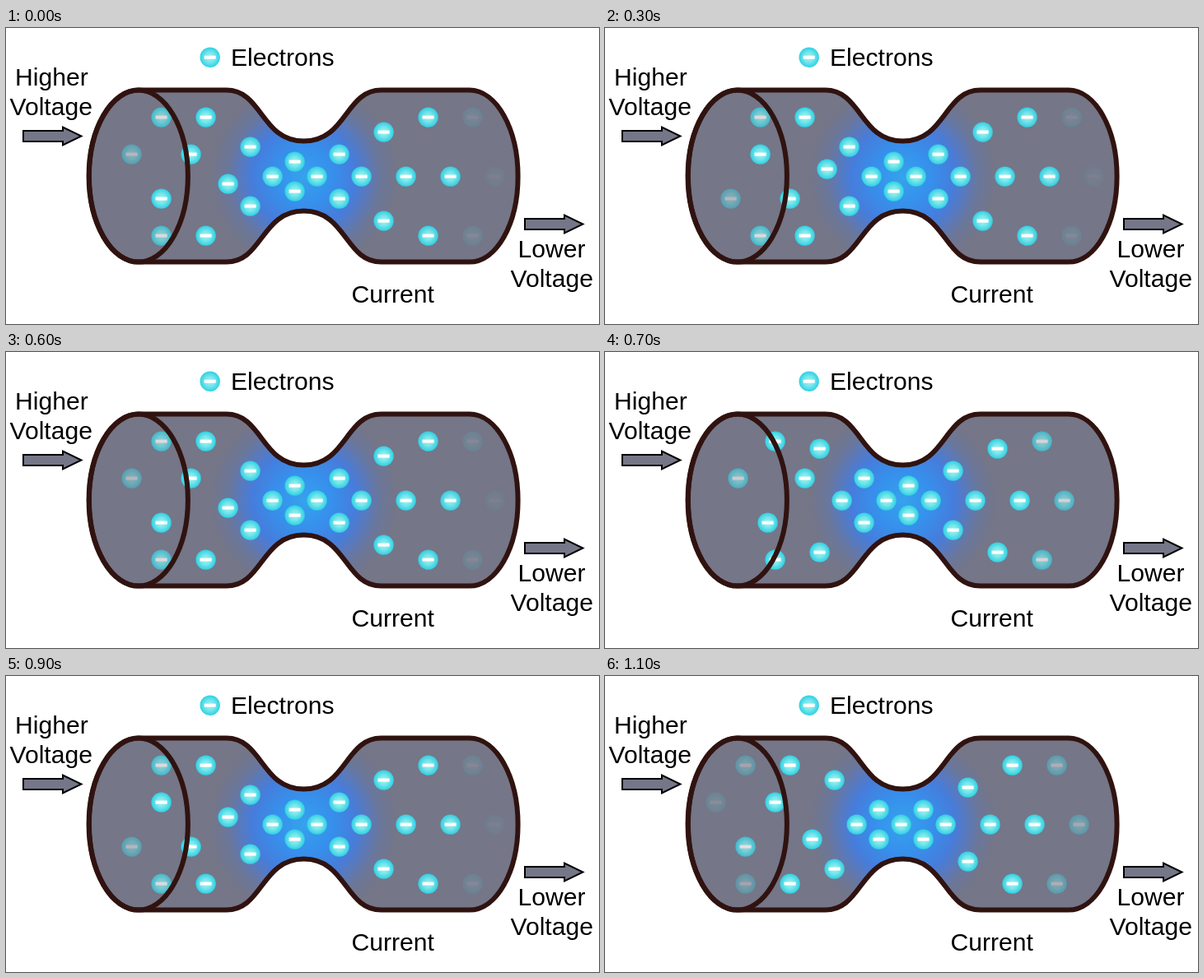
An HTML page that plays this animation: 720x360 px, repeating every 1200 ms.

```html
<!DOCTYPE html>
<html lang="en">
<head>
<meta charset="utf-8">
<title>Current through a conductor</title>
<style>
  html, body { margin: 0; width: 100%; height: 100%; overflow: hidden; background: #fff; }
  svg { display: block; width: 720px; height: 360px; }
  text { font: 30.1px "Liberation Sans", Arial, sans-serif; }
</style>
</head>
<body>
<svg viewBox="0 0 720 360">
  <defs>
    <radialGradient id="cyan">
      <stop offset="0" stop-color="#a9f3f1"/>
      <stop offset=".5" stop-color="#76e6ea"/>
      <stop offset="1" stop-color="#2fd0e4"/>
    </radialGradient>
    <radialGradient id="glow" gradientUnits="userSpaceOnUse" cx="361" cy="180" r="114">
      <stop offset="0" stop-color="#36a2ec"/>
      <stop offset=".3" stop-color="#3690ec"/>
      <stop offset=".55" stop-color="#467ddc"/>
      <stop offset=".7" stop-color="#5c79b8"/>
      <stop offset=".81" stop-color="#6a779b"/>
      <stop offset="1" stop-color="#757687"/>
    </radialGradient>
    <g id="electron">
      <circle r="12.2" fill="url(#cyan)"/>
      <rect x="-7" y="-2" width="14" height="4" fill="#fff"/>
    </g>
    <path id="arrow" d="M0-6.5H48V-11L70.5 0 48 11V6.5H0Z" fill="#757687" stroke="#000" stroke-width="2"/>
  </defs>

  <g transform="translate(.6 .6)">
    <path fill="url(#glow)" stroke="#301310" stroke-width="6" d="M160 75H267C311 75 309 137 361 137S411 75 455 75H562C595 75 621 122 621 180S595 284 562 284H455C411 284 413 222 361 222S311 284 267 284H160A60 104.5 0 0 1 160 75Z"/>
    <g id="electrons"></g>
    <ellipse cx="160.3" cy="179.5" rx="60" ry="104.5" fill="none" stroke="#301310" stroke-width="6"/>
  </g>

  <use href="#electron" x="247.7" y="35.7"/>
  <use href="#arrow" x="21" y="131.5"/>
  <use href="#arrow" x="630" y="238.5"/>
  <text x="273" y="46">Electrons</text>
  <text x="11" y="70">Higher</text>
  <text x="4.5" y="106">Voltage</text>
  <text x="621.5" y="279">Lower</text>
  <text x="612.5" y="315">Voltage</text>
  <text x="419.5" y="334">Current</text>
</svg>
<script>
const STEP = 100, STEPS = 12, SPEED = 18, SPACING = 3 * SPEED, GRID = 9, AXIS = 180;
const layer = document.getElementById("electrons");
const pool = [];

const clamp = (value, low = 0, high = 1) => Math.min(high, Math.max(low, value));
const snap = value => GRID * Math.round(value / GRID);

// The outer rows squeeze into the neck quickly and spread out again slowly
const rowOffset = x => snap(clamp(Math.max(18 + (332 - x) * .6, 18 + (x - 386) / 2), 18, 72));
const rowFade = x => clamp((x - 155) / 45) * clamp((574 - x) / 64);

// Inner electrons speed up until they join the axis, alternating above and below it
const laneX = stepsLeft => 188 + snap(98 - 16.56 * stepsLeft + .28 * stepsLeft ** 2);
const laneOffset = x => snap(clamp((287 - x) / 2, 0, 27));

function electronsAt(step) {
  const list = [];
  const add = (x, y, opacity) => list.push({ x, y, opacity });
  const phase = step % 3;

  for (let x = 170 + (phase + 1) % 3 * SPEED; x < 574; x += SPACING)
    for (const side of [-1, 1]) add(x, AXIS + side * rowOffset(x), rowFade(x));

  for (let x = 287 + (phase + 2) % 3 * SPEED; x < 597; x += SPACING)
    add(x, AXIS, clamp((597 - x) / 60));

  for (let lane = 0; lane < 4; lane++) {
    const stepsLeft = (1 + 3 * lane - step + STEPS) % STEPS;
    if (!stepsLeft) continue;
    const x = laneX(stepsLeft);
    const side = lane % 2 ? -1 : 1;
    add(x, AXIS + side * laneOffset(x), clamp((x - 125) / 58));
  }
  return list;
}

function draw(time) {
  const list = electronsAt(Math.floor(time / STEP) % STEPS);
  while (pool.length < list.length) {
    const node = document.createElementNS("http://www.w3.org/2000/svg", "use");
    node.setAttribute("href", "#electron");
    pool.push(layer.appendChild(node));
  }
  pool.forEach((node, i) => {
    const state = list[i] || { opacity: 0 };
    for (const name in state) node.setAttribute(name, state[name]);
  });
}

const begin = performance.now();
function tick() {
  draw(performance.now() - begin);
  requestAnimationFrame(tick);
}
tick();
</script>
</body>
</html>
```
